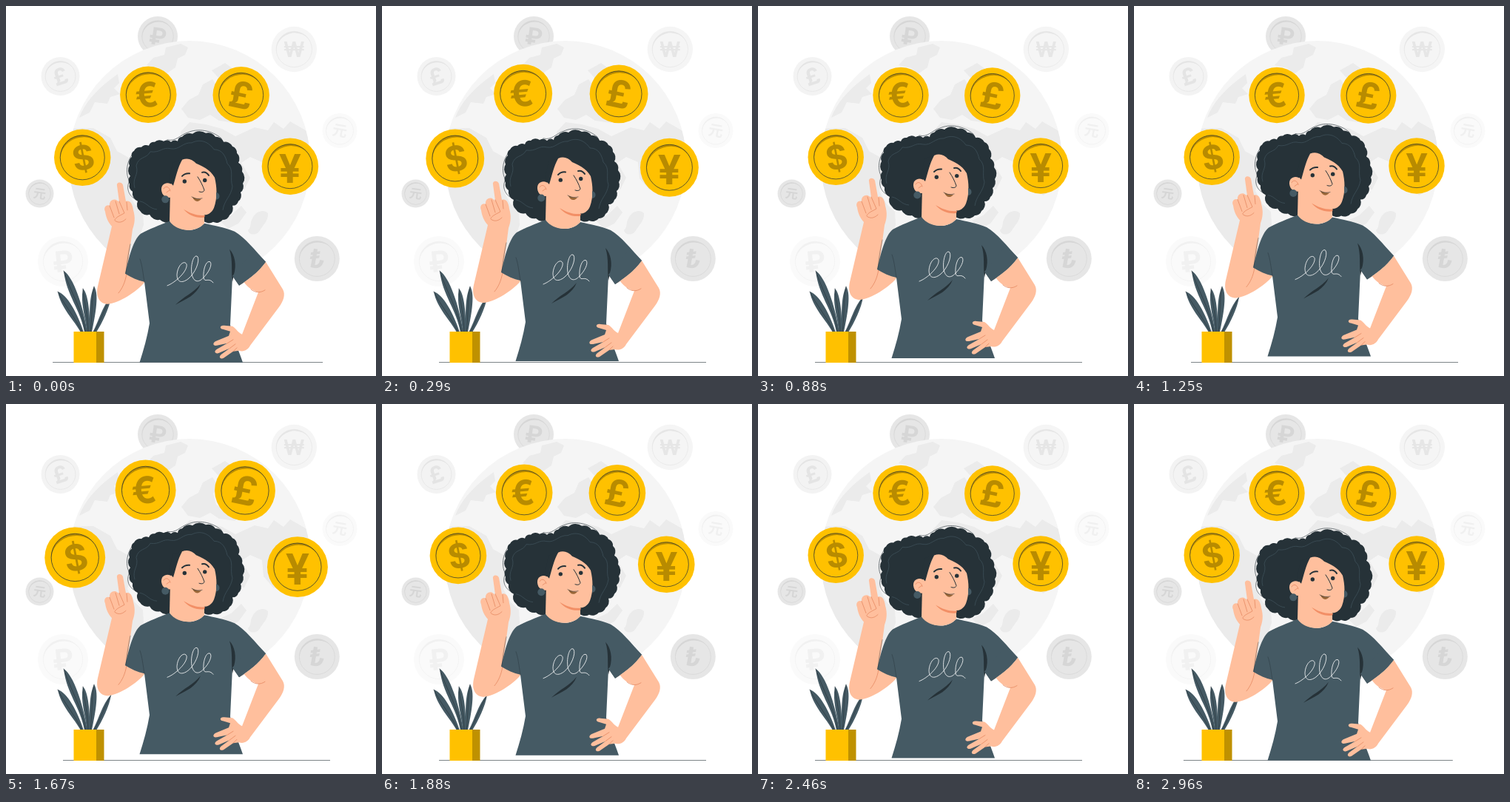
These frames come from a looping animation (500 by 500 pixels, 3000 ms). An HTML page:

```html
<!DOCTYPE html>
<html lang="en">
<head>
<meta charset="utf-8">
<title>World currencies</title>
<style>
  html, body { margin: 0; width: 100%; height: 100%; overflow: hidden; background: #fff; }
  svg { display: block; width: 100vw; height: 100vh; }
  text { font-family: Inter, "Noto Sans", "Noto Sans CJK SC", sans-serif; font-weight: 700; text-anchor: middle; }
  .skin { fill: #ffbf9d; }
  .shirt { fill: #455a64; }
  .dark { fill: #263238; }
  .thin { fill: none; stroke: #263238; stroke-width: .6; stroke-linecap: round; stroke-linejoin: round; }
  .fold { fill: none; stroke: #e58a62; stroke-width: .8; stroke-linecap: round; }
  .strand { fill: none; stroke: #455a64; stroke-width: .6; }
  .land { fill: #ebebeb; }
</style>
</head>
<body>
<svg viewBox="0 0 500 500" preserveAspectRatio="xMidYMid meet">
  <defs><clipPath id="disc"><circle cx="248" cy="210" r="163"/></clipPath></defs>

  <g id="pale"></g>

  <circle cx="248" cy="210" r="163" fill="#f5f5f5"/>
  <g class="land" clip-path="url(#disc)">
    <path d="M99 151C106 132 122 112 151 92L153 104L146 111L154 119L141 123L137 132L120 130L113 144Z"/>
    <path d="M190 80L199 70L214 66L216 56L236 51L246 56L242 66L232 71L229 83L216 92L207 84Z"/>
    <path d="M237 139L247 127L260 120L266 106L279 99L288 112L280 121L284 136L298 145L314 149L310 158L288 155L276 147L262 154L246 151Z"/>
    <path d="M278 87L296 77L310 87L305 96L288 98Z"/>
    <path d="M236 170L248 157L270 160L292 166L310 176L336 164L354 168L362 157L375 166L384 156L412 172L412 240L385 256L372 240L362 249L348 233L346 211L330 204L318 212L330 232L322 248L304 246L240 200Z"/>
    <path d="M70 166L118 165L141 178L150 196L166 205L169 232L164 250L174 268L185 278L186 296L178 318L160 350L70 340Z"/>
    <path d="M333 287C337 277 349 274 354 280C355 290 347 296 342 305C336 311 328 309 327 303C332 299 329 294 333 287Z"/>
    <path d="M289 290L304 283L318 270L325 279L314 294L300 301Z"/>
  </g>
  <g id="over"></g>
  <g id="gold"></g>

  <path id="floor" fill="none" stroke="#263238" stroke-width=".6"/>

  <g id="plant">
    <path class="shirt" d="M101 441C92 424 74 408 70 386C83 390 97 416 105 441Z"/>
    <path class="shirt" d="M106 441C101 410 82 392 78 358C91 366 104 404 110 441Z"/>
    <path class="shirt" d="M109 441C108 420 100 402 104 382C111 388 114 418 113 441Z"/>
    <path class="shirt" d="M112 441C114 420 111 396 119 379C127 390 119 425 116 441Z"/>
    <path class="shirt" d="M117 441C124 430 130 405 142 393C140 408 130 428 122 441Z"/>
    <path class="thin" d="M103 441C93 420 78 403 70 386M108 441C102 408 88 388 78 358M111 441C111 418 105 398 104 382M114 441C117 419 115 397 119 379M119 441C127 428 133 409 142 393"/>
    <path fill="#ffc100" d="M91.500 440H122V482H91.500Z"/>
    <path fill="#bf9100" d="M122 440H132.500V482H122Z"/>
  </g>

  <g id="person">
    <path id="hair" class="dark"/>
    <path class="thin" d="M177 262C165 258 162 245 167 237C160 225 164 207 173 198M218 181C230 184 235 174 246 171C259 165 278 168 291 179C293 186 299 187 300 191"/>
    <path class="strand" d="M174 246C170 232 180 229 176 216C179 203 190 207 195 197C209 199 211 190 223 193C234 195 239 184 251 185C263 179 274 184 281 194C293 194 297 204 299 213C309 222 302 232 306 244C304 258 295 262 293 276M181 264C191 266 193 274 204 275"/>

    <!-- Raised arm -->
    <path class="skin" d="M150 243C149 238 156 237 158 242L162 264C168 262 171 268 172 276C175 286 174 294 171 302L163 362L188 373C176 387 154 401 138 403C126 403 121 393 124 379L143 298C137 291 135 285 134 278C131 271 137 268 140 270C139 262 147 260 150 263L153 265Z"/>
    <path class="fold" d="M140 270L146 286M148 264L153 281M153 264L160 280C155 283 149 285 147 289M163 265L164 276M147 290C153 295 159 291 162 288M163 362C161 374 157 382 152 388"/>

    <!-- Shirt -->
    <path class="shirt" d="M221 291C208 296 193 302 182 308C172 316 166 340 161 362C169 367 178 371 187 373L194 429C191 447 186 465 180.500 482H320C314 464 306 448 303 431L306 365L315 378C327 370 341 360 351 346C337 331 323 313 309 305C295 299 281 297 268 294C256 307 235 306 221 291Z"/>
    <path class="dark" d="M302 329C309 336 312 350 308 363L306 373C304 357 307 345 302 329Z"/>
    <path class="dark" d="M229 404C241 392 252 389 263 376C257 391 244 396 229 404Z"/>
    <path class="thin" d="M168 322C165 336 163 350 162 361M187 373C185 361 184 350 181 342" stroke-opacity=".7"/>
    <path fill="none" stroke="#fff" stroke-width=".8" stroke-linecap="round" d="M218 378C229 374 246 358 244 349C241 343 232 350 231 363C231 374 238 375 246 369C256 361 262 345 259 339C254 334 249 350 251 362C253 373 260 375 267 367C274 360 279 350 276 346C270 343 266 358 267 367C268 375 274 366 280 374"/>

    <!-- Hand on hip -->
    <path class="skin" d="M315 378C327 370 341 360 351 346L374 383C378 390 375 399 369 407L330 459C327 465 321 468 315 466L307 467L294 476C289 478 287 474 291 471L302 463L288 469C283 471 280 467 285 464L299 456L285 459C279 460 279 455 284 453L301 446L303 440L293 437C288 436 289 431 295 432L306 433C311 436 314 442 319 444L341 387C334 385 327 381 322 374Z"/>
    <path class="shirt" d="M306 365L315 378C327 370 341 360 351 346L335 330Z"/>
    <path class="fold" d="M299 456L307 451M302 463L310 457M307 467L312 462M331 383C337 388 344 388 350 384"/>

    <!-- Head -->
    <path class="skin" d="M222 249L221 291C231 306 257 307 268 294L268 279L245 260Z"/>
    <path fill="#f28f66" d="M240 275C250 281 259 284 269 283L268 286C256 287 247 283 240 275Z"/>
    <path class="skin" d="M238 208C245 205 252 207 257 213C264 216 276 221 282 232C285 244 286 260 281 273C277 282 270 284 261 282C249 280 236 274 227 263L222 252C222 240 226 220 238 208Z"/>
    <path class="skin" d="M226 244C221 236 209 239 210 249C211 258 219 261 226 258Z"/>
    <path class="fold" d="M213 247C216 242 221 245 222 250M217 252L221 249"/>
    <path class="dark" d="M238 208C232 219 230 230 226 243L220 237L225 212Z"/>
    <circle class="dark" cx="241.300" cy="237.200" r="2.700"/>
    <circle class="dark" cx="268.700" cy="235.600" r="2.700"/>
    <path d="M238 230C241 227 244 226 248 226.500M265 225C269 224 272 226 274 229" fill="none" stroke="#263238" stroke-width="2" stroke-linecap="round"/>
    <path class="thin" d="M259 231C263 237 266 243 268 249C267 252 264 252 261 251" style="stroke-width:1"/>
    <path fill="#9a6738" d="M252 258C257 261 260 261 264 261C260 266 254 265 252 258Z"/>
    <path class="thin" d="M251 258C255 261 260 261 265 260"/>
    <circle class="shirt" cx="215.300" cy="261.500" r="5"/>
    <path class="shirt" d="M284 252C290 253 290 262 284 262Z"/>
  </g>
</svg>
<script>
const $ = id => document.getElementById(id);

function coin({ x, y, r, sign, size, turn = 0, fill, ink, edge = ink, dx = 0, dy = 0 }) {
  const i = r * .785;
  return `<g transform="translate(${x} ${y})">
    <circle r="${r}" fill="${fill}"/>
    <path d="M${-i} 0A${i} ${i} 0 0 1 ${i} 0A${i} ${i * .91} 0 0 0 ${-i} 0Z" fill="${ink}" transform="rotate(-18)"/>
    <circle r="${i}" fill="none" stroke="${edge}" stroke-width=".7"/>
    <text transform="translate(${dx} ${dy}) rotate(${turn})" y="${size * .36}" font-size="${size}" fill="${ink}">${sign}</text></g>`;
}

const gold = { r: 37.7, fill: "#ffc100", ink: "#b88b00", edge: "#263238" };
$("gold").innerHTML = [
  { x: 105.2, y: 204.3, sign: "$", size: 45, turn: -11, dx: 1 },
  { x: 193, y: 120.5, sign: "€", size: 46, turn: -5, dx: -2 },
  { x: 316.7, y: 121, sign: "£", size: 49, turn: 12 },
  { x: 382, y: 216, sign: "¥", size: 53, dy: 3 }
].map(c => coin({ ...gold, ...c })).join("");

$("pale").innerHTML = coin({ x: 205, y: 41, r: 27, sign: "₽", size: 32, turn: 8, fill: "#e6e6e6", ink: "#d6d6d6" });
$("over").innerHTML = [
  { x: 389.3, y: 58.5, r: 30.7, sign: "₩", size: 28, fill: "#f5f5f5", ink: "#e6e6e6" },
  { x: 73.5, y: 95, r: 26, sign: "£", size: 31, turn: -18, fill: "#f3f3f3", ink: "#e4e4e4" },
  { x: 451, y: 168.5, r: 23.5, sign: "元", size: 20, turn: 10, fill: "#fafafa", ink: "#f0f0f0" },
  { x: 45.5, y: 253.5, r: 19, sign: "元", size: 17, turn: 8, fill: "#e6e6e6", ink: "#d6d6d6" },
  { x: 77, y: 345, r: 34, sign: "₽", size: 39, turn: -6, fill: "#fafafa", ink: "#f1f1f1" },
  { x: 420.3, y: 341.5, r: 30.5, sign: "₺", size: 35, turn: 10, fill: "#e6e6e6", ink: "#d6d6d6" }
].map(coin).join("");

// Curly outline: one outward arc per pair of neighbours
const curls = [
  [224, 291], [208, 289], [194, 282], [181, 277], [178, 264], [171, 251], [167, 241], [168, 230],
  [167, 216], [170, 204], [173, 196], [183, 191], [193, 189], [201, 184], [213, 183], [223, 184],
  [232, 183], [238, 177], [252, 173], [270, 172], [283, 177], [294, 184], [306, 190], [312, 199],
  [314, 212], [319, 224], [320, 240], [317, 252], [314, 264], [306, 270], [302, 283], [293, 289],
  [280, 292], [266, 290]
];
$("hair").setAttribute("d", curls.map(([x, y], n) => {
  if (!n) return `M${x} ${y}`;
  const [px, py] = curls[n - 1], r = Math.hypot(x - px, y - py) * .8;
  return `A${r} ${r} 0 0 1 ${x} ${y}`;
}).join("") + "Z");

const LOOP = 3000, LEAD = 20;
const beat = [[0, 1], [.1, 1.1], [.3, 1], [.4, 1], [.5, 1.1], [.6, 1], [1, 1]];

function at(steps, p) {
  const n = Math.max(1, steps.findIndex(s => s[0] >= p));
  const [a, u] = steps[n - 1], [b, v] = steps[n];
  return u + (v - u) * (p - a) / (b - a);
}

function draw(ms) {
  const t = ms % LOOP, p = (t + LEAD) % LOOP;
  const scale = at(beat, p % 1500 / 1500);
  $("gold").setAttribute("transform", `translate(244 168) scale(${scale}) translate(-244 -168)`);

  const lift = 10 * (1 - Math.abs(1 - p / 1500));
  $("person").setAttribute("transform", `translate(0 ${-lift})`);

  const near = Math.max(0, 1 - Math.min(t, LOOP - t) / 140);
  $("floor").setAttribute("d", `M${77 - 14 * near} 481.500H${438 - 10 * near}`);
}

const start = performance.now();
function tick() {
  draw(performance.now() - start);
  requestAnimationFrame(tick);
}
draw(0);
requestAnimationFrame(tick);
</script>
</body>
</html>
```
